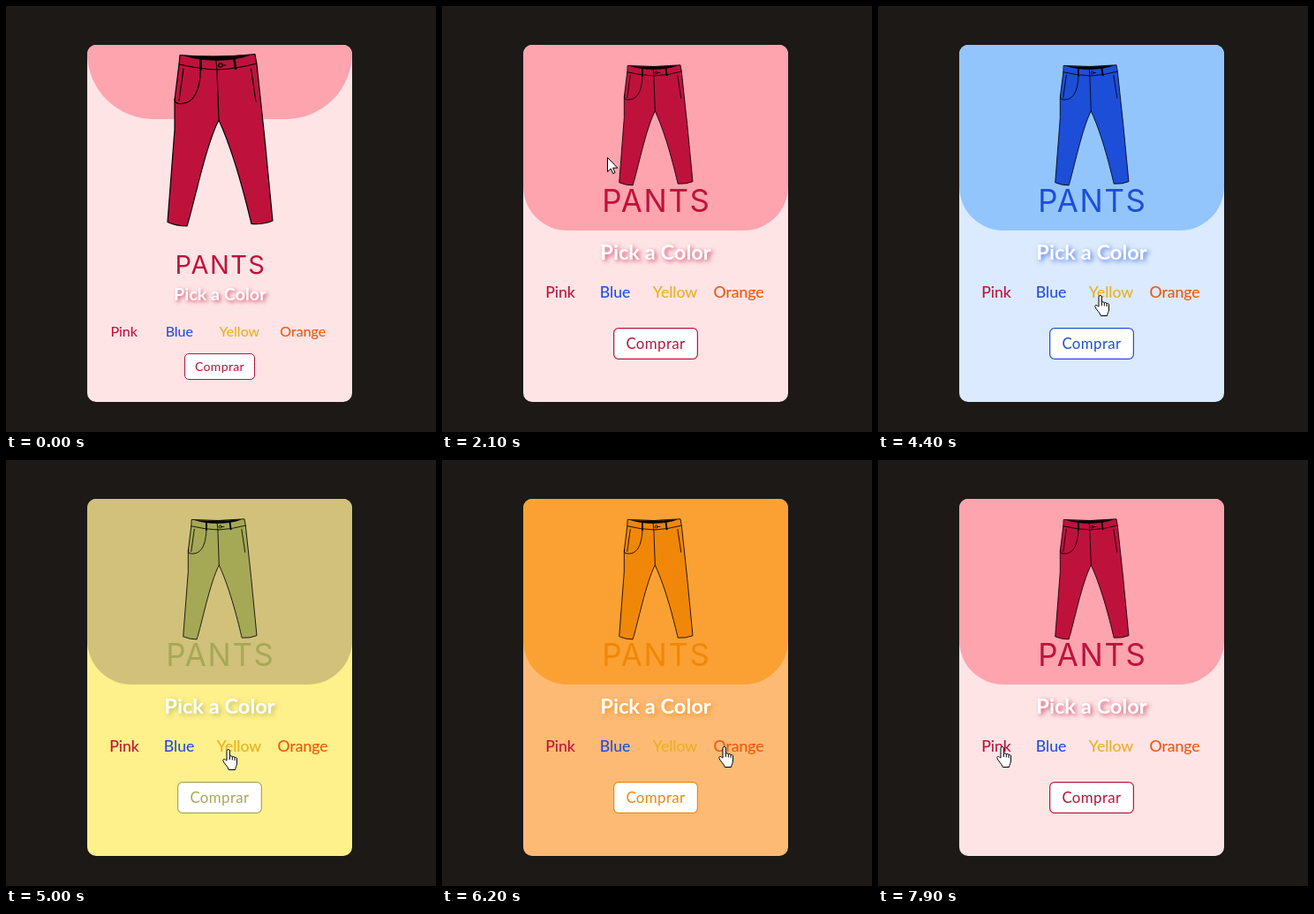
Write an HTML page that moves like this. It is 487 by 482 pixels and loops after 8000 ms.

```html
<!DOCTYPE html>
<html lang="en">
<head>
<meta charset="utf-8">
<title>Pants colour picker</title>
<style>
  @property --p { syntax: "<number>"; inherits: true; initial-value: 0; }
  @property --main { syntax: "<color>"; inherits: true; initial-value: #be123c; }
  @property --soft { syntax: "<color>"; inherits: true; initial-value: #fda4af; }
  @property --page { syntax: "<color>"; inherits: true; initial-value: #ffe4e6; }

  html, body { margin: 0; width: 100%; height: 100%; overflow: hidden; background: #1c1917; }

  .stage {
    position: absolute; left: 0; top: 0; width: 487px; height: 482px; overflow: hidden;
    font-family: Lato, "Open Sans", sans-serif;
    animation: open 8s step-end infinite, main 8s step-end infinite, page 8s step-end infinite;
  }
  .card {
    position: absolute; left: 92px; top: 44px; width: 300px; height: 404px;
    border-radius: 10px; overflow: hidden; background: var(--page);
  }
  .head {
    height: calc(84px + 126px * var(--p));
    border-radius: 0 0 calc(75px - 25px * var(--p)) calc(75px - 25px * var(--p));
    background: var(--soft);
  }

  /* centred at (x, y); moves by dy and grows by k as the card opens */
  .at {
    position: absolute; white-space: nowrap; line-height: 1.2;
    left: calc(var(--x, 242) * 1px);
    top: calc((var(--y) + var(--dy) * var(--p)) * 1px);
    transform: translate(-50%, -50%) scale(calc(1 + var(--k) * var(--p)));
  }
  .pants { --y: 152; --dy: -16.6; --k: -.3; width: 124px; height: 200px; }
  .title {
    --x: 243; --y: 292.5; --dy: -71.5; --k: .2;
    font: 400 29px/1.2 Inter, sans-serif; letter-spacing: .05em; color: var(--main);
  }
  .pick {
    --x: 242.3; --y: 326; --dy: -48; --k: .2;
    font-size: 19.7px; font-weight: 700; color: #fff;
    text-shadow: 2px 2px 4px color-mix(in srgb, var(--main) 70%, transparent);
  }
  .word { --y: 368; --dy: -45; --k: .1; font-size: 16px; -webkit-text-stroke: .1px currentColor; }
  .buy {
    --y: 408; --dy: -26; --k: .2;
    box-sizing: border-box; width: 80px; height: 30px; line-height: 28px; text-align: center;
    border: 1px solid var(--main); border-radius: 5px; background: #fff; color: var(--main);
    font-size: 14px; letter-spacing: .025em;
  }

  .cursor { position: absolute; left: 0; top: 0; animation: move 8s step-end infinite; }
  .cursor svg { position: absolute; overflow: visible; fill: #fff; stroke: #000; stroke-linejoin: round; }
  .arrow { animation: arrow 8s step-end infinite; }
  .hand { left: -6px; opacity: 0; animation: hand 8s step-end infinite; }

  @keyframes open {
    0% { --p: 0; }
    17.5% { --p: 0; animation-timing-function: steps(4, start); }
    22.5% { --p: .66; }
    23.75% { --p: .66; animation-timing-function: steps(3, start); }
    27.5%, 100% { --p: 1; }
  }
  @keyframes main {
    0% { --main: #be123c; --soft: #fda4af; }
    43.75% { --main: #be123c; --soft: #fda4af; animation-timing-function: steps(3, start); }
    47.5% { --main: #1d4ed8; --soft: #93c5fd; }
    60% { --main: #1d4ed8; --soft: #93c5fd; animation-timing-function: steps(5, start); }
    66.25% { --main: #ffe500; --soft: #fbbf24; }
    73.75% { --main: #ffe500; --soft: #fbbf24; animation-timing-function: steps(6, start); }
    81.25% { --main: #ea580c; --soft: #fb923c; }
    93.75% { --main: #ea580c; --soft: #fb923c; animation-timing-function: steps(5, start); }
    100% { --main: #be123c; --soft: #fda4af; }
  }
  @keyframes page {
    0% { --page: #ffe4e6; }
    43.75% { --page: #dbeafe; }
    60% { --page: #fef08a; }
    73.75% { --page: #fdba74; }
    93.75%, 100% { --page: #ffe4e6; }
  }
  @keyframes move {
    0% { transform: translate(-40px, -40px); }
    7.5% { transform: translate(5px, -8px); }
    8.75% { transform: translate(3px, -11px); }
    10% { transform: translate(-40px, -40px); }
    15% { transform: translate(12px, 110px); animation-timing-function: steps(4); }
    20% { transform: translate(187px, 171px); }
    28.75% { transform: translate(187px, 171px); animation-timing-function: steps(2); }
    31.25% { transform: translate(280px, 300px); animation-timing-function: steps(2); }
    33.75% { transform: translate(190px, 379px); }
    35% { transform: translate(132px, 331px); }
    41.25% { transform: translate(132px, 331px); animation-timing-function: steps(2); }
    43.75% { transform: translate(200px, 331px); }
    48.75% { transform: translate(200px, 331px); animation-timing-function: steps(5); }
    55% { transform: translate(251px, 327px); }
    66.25% { transform: translate(251px, 327px); animation-timing-function: steps(4); }
    71.25% { transform: translate(319px, 324px); }
    85% { transform: translate(319px, 324px); animation-timing-function: steps(3); }
    88.75% { transform: translate(167px, 326px); }
    90% { transform: translate(167px, 326px); animation-timing-function: steps(2); }
    92.5% { transform: translate(145px, 327px); }
    96.25% { transform: translate(145px, 327px); animation-timing-function: steps(2); }
    98.75%, 100% { transform: translate(140px, 324px); }
  }
  @keyframes arrow { 0%, 88.75% { opacity: 1; } 35%, 91.25%, 100% { opacity: 0; } }
  @keyframes hand { 0%, 88.75% { opacity: 0; } 35%, 91.25%, 100% { opacity: 1; } }
</style>
</head>
<body>
<div class="stage">
  <div class="card"><div class="head"></div></div>

  <svg class="at pants" viewBox="180 52 124 200" fill="none" stroke="#000" stroke-width="1.2"
       stroke-linecap="round" stroke-linejoin="round">
    <path d="M197 55.5Q240 59 282 54.5L284 66 293 150 302 243Q291 247.5 278 246.5C273 226 260 170 241 129
             C226 158 213 224 205 249Q193 249 183 244.5L191 140V106L196 66Z" style="fill:var(--main)"/>
    <path d="M203 56.5Q240 58.5 276 55.5Q262 61 239 61.5Q217 61 203 56.5Z" fill="#000" stroke-width=".6"/>
    <path d="M196 66Q220 71.5 240 72Q262 71 284 65M238 62L239 72 241 129"/>
    <path d="M220.5 71C220 93 214 112 196 110.5Q190 110 191.5 104M201 71L196 107M277.5 71L283 108"/>
    <path d="M220.5 60V72M258.5 60L260 71" stroke-width="2.6"/>
    <circle cx="243" cy="67" r="2.2"/>
    <path d="M245 67H249"/>
  </svg>

  <div class="at title">PANTS</div>
  <div class="at pick">Pick a Color</div>
  <div class="at word" style="--x:133.7;color:#be123c">Pink</div>
  <div class="at word" style="--x:196.3;color:#1d4ed8">Blue</div>
  <div class="at word" style="--x:264.3;color:#eab020">Yellow</div>
  <div class="at word" style="--x:336.3;color:#ea580c">Orange</div>
  <div class="at buy">Comprar</div>

  <div class="cursor">
    <svg class="arrow" width="13" height="20">
      <path d="M.5 .5V16.5L4.2 13 6.7 18.6 9 17.6 6.6 12.2H11.8Z"/>
    </svg>
    <svg class="hand" width="18" height="25">
      <path d="M5 13V2.2a1.7 1.7 0 0 1 3.4 0V8.5a1.6 1.6 0 0 1 2.9 .6a1.6 1.6 0 0 1 2.8 .8
               a1.4 1.4 0 0 1 2.4 1V16c0 3-1.6 4.5-2 7.5H7.3C6.5 20 2 16.5 1 13.5
               c-.6-2 1.4-2.8 2.6-1.2Z"/>
      <path d="M8.4 8.5V12M11.3 9.1V12.5M14.1 9.9V13" fill="none"/>
    </svg>
  </div>
</div>
</body>
</html>
```
